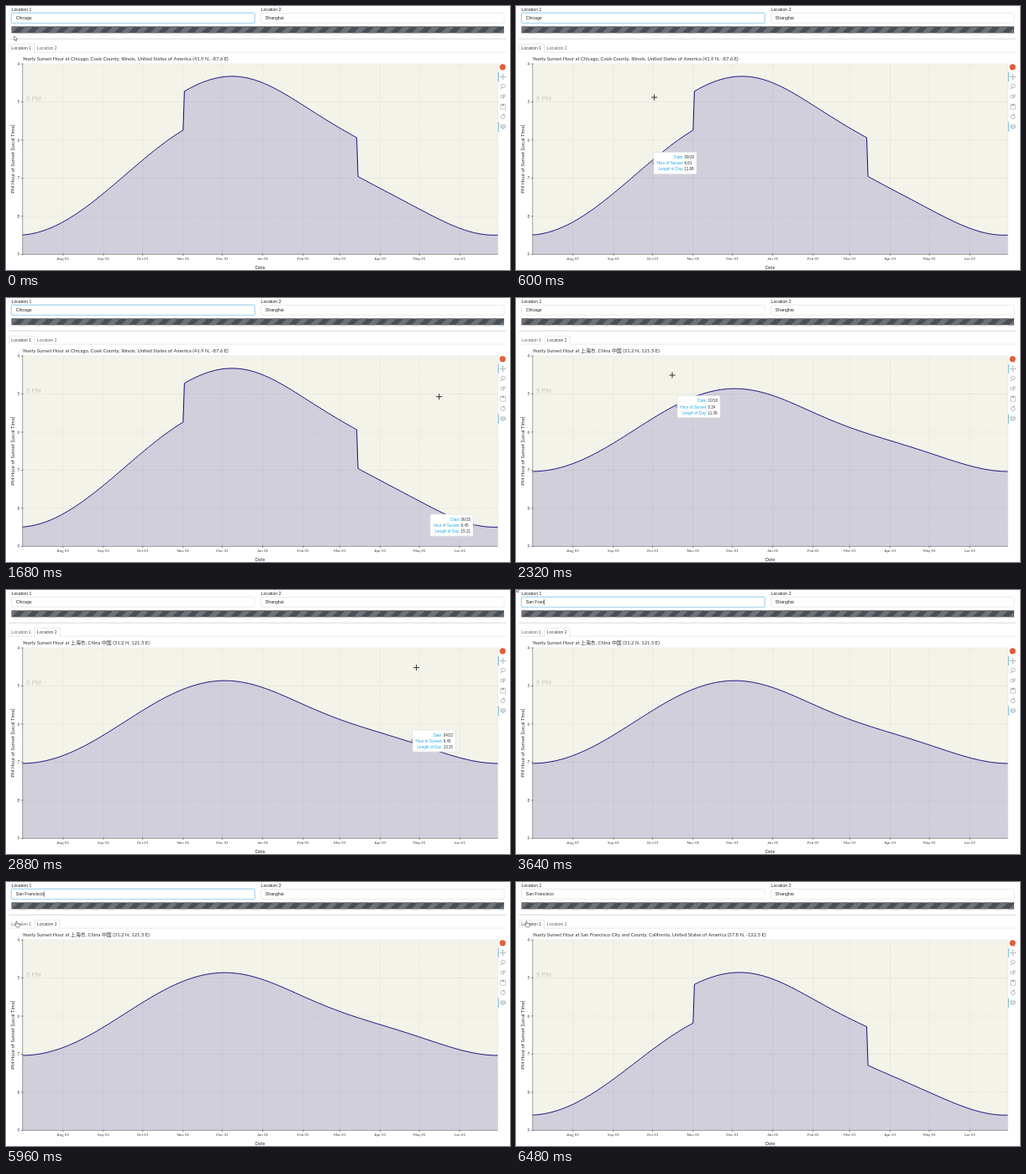
An HTML page with a canvas for the animation above (6.56 s loop, 600 by 315 pixels).

```html
<!DOCTYPE html>
<html lang="en">
<head>
<meta charset="utf-8">
<title>Yearly sunset hours</title>
<style>
html, body { margin: 0; width: 100%; height: 100%; overflow: hidden; background: #fff; }
canvas { display: block; width: 600px; height: 315px; }
</style>
</head>
<body>
<canvas id="stage"></canvas>
<script>
const LOOP = 6560;
const SANS = '"Liberation Sans", Arial, sans-serif';
const LATO = 'Lato, "Noto Sans CJK SC", "Noto Sans CJK", sans-serif';
const LEFT = 19.7, TOP = 69, RIGHT = 585.5, BOTTOM = 296.4;
const DAY = 1.554, HOUR = (BOTTOM - TOP) / 5;
const RAD = Math.PI / 180;

const PLACES = {
  chicago: { title: 'Chicago, Cook County, Illinois, United States of America (41.9 N, -87.6 E)',
    lat: 41.9, lon: -87.6, zone: -6, dst: true },
  shanghai: { title: '上海市, China 中国 (31.2 N, 121.5 E)',
    lat: 31.2, lon: 121.5, zone: 8, dst: false },
  sanFrancisco: { title: 'San Francisco City and County, California, United States of America (37.8 N, -122.5 E)',
    lat: 37.8, lon: -122.5, zone: -8, dst: true }
};

const MONTHS = [['Aug', 31], ['Sep', 62], ['Oct', 92], ['Nov', 123], ['Dec', 153], ['Jan', 184],
  ['Feb', 215], ['Mar', 243], ['Apr', 274], ['May', 304], ['Jun', 335]];

// Pointer path: time, x, y
const PATH = [[0, 9.7, 35.6], [80, 11, 42], [200, 22, 95], [600, 164.5, 109], [1160, 223, 111],
  [1360, 300, 112], [1660, 565, 125], [1880, 48, 49], [2040, 48, 49], [2160, 75, 85],
  [2280, 186, 92], [2340, 186, 92], [2720, 400, 95], [2920, 510, 92], [3100, 45, 14],
  [3200, 45, 14], [3320, 0, -3], [5320, 0, -3], [5900, 12, 47], [6480, 12, 47], [6560, 9.7, 35.6]];
const TAB_2 = 1960, FOCUS = 3160, TYPE = 3280, TAB_1 = 6160;

const canvas = document.getElementById('stage');
const ctx = canvas.getContext('2d');
const scale = window.devicePixelRatio || 1;
canvas.width = 600 * scale;
canvas.height = 315 * scale;

const dayX = d => LEFT + d * DAY;
const hourY = h => TOP + (h - 4) * HOUR;

// Solar position for a day counted from July 1
function sun(place, d) {
  const g = 2 * Math.PI / 365.25 * (182.7 + d);
  const { cos, sin, tan } = Math;
  const dec = 0.006918 - 0.399912 * cos(g) + 0.070257 * sin(g) - 0.006758 * cos(2 * g)
    + 0.000907 * sin(2 * g) - 0.002697 * cos(3 * g) + 0.00148 * sin(3 * g);
  const eqTime = 229.18 * (0.000075 + 0.001868 * cos(g) - 0.032077 * sin(g)
    - 0.014615 * cos(2 * g) - 0.040849 * sin(2 * g));
  const lat = place.lat * RAD;
  const angle = Math.acos(cos(90.833 * RAD) / (cos(lat) * cos(dec)) - tan(lat) * tan(dec)) / RAD;
  const summer = place.dst && (d <= 123 || d >= 257) ? 1 : 0;
  return {
    sunset: (4 * (angle - place.lon) - eqTime) / 60 + place.zone + summer,
    length: angle * 2 / 15
  };
}

function text(str, x, y, size, color = '#222', align = 'left', family = SANS) {
  ctx.font = `${size}px ${family}`;
  ctx.fillStyle = color;
  ctx.textAlign = align;
  ctx.fillText(str, x, y);
}

function line(points, color, width = 0.6, dash = []) {
  ctx.beginPath();
  points.forEach(([x, y]) => ctx.lineTo(x, y));
  ctx.setLineDash(dash);
  ctx.strokeStyle = color;
  ctx.lineWidth = width;
  ctx.stroke();
  ctx.setLineDash([]);
}

function box(x, y, w, h, fill, stroke, r = 0, width = 0.6) {
  ctx.beginPath();
  ctx.roundRect(x, y, w, h, r);
  if (fill) { ctx.fillStyle = fill; ctx.fill(); }
  if (stroke) { ctx.strokeStyle = stroke; ctx.lineWidth = width; ctx.stroke(); }
}

function shape(points, fill, stroke, width = 0.6) {
  ctx.beginPath();
  points.forEach(([x, y]) => ctx.lineTo(x, y));
  ctx.closePath();
  ctx.fillStyle = fill;
  ctx.fill();
  if (stroke) { ctx.strokeStyle = stroke; ctx.lineWidth = width; ctx.stroke(); }
}

function input(x, label, value, focused, caret) {
  text(label, x, 6.4, 5.2);
  if (focused) box(x - 0.5, 8, 290.5, 12.8, null, '#d3ebf8', 2, 1.3);
  box(x, 8.5, 289.5, 11.8, '#fff', focused ? '#83c4e8' : '#dcdcdc', 1.5);
  text(value, x + 5.2, 16.4, 5.2);
  if (caret) {
    const end = x + 5.6 + ctx.measureText(value).width;
    line([[end, 11.4], [end, 17.6]], '#111', 0.6);
  }
}

function stripes() {
  const x = 6.5, y = 24.2, w = 586.5, h = 8.4, step = 17.3;
  ctx.save();
  ctx.beginPath();
  ctx.rect(x, y, w, h);
  ctx.clip();
  ctx.fillStyle = '#4a5057';
  ctx.fillRect(x, y, w, h);
  for (let s = x; s < x + w + step; s += step)
    shape([[s, y], [s + step / 2, y], [s + step / 2 - h, y + h], [s - h, y + h]], '#6e7276');
  ctx.restore();
}

function tabs(active) {
  line([[3.5, 55.2], [595, 55.2]], '#e0e0e0');
  [4, 34.5].forEach((x, i) => {
    if (i === active) {
      box(x - 0.3, 45, 29.6, 11, '#fff');
      line([[x, 55.4], [x, 45.3], [x + 29.5, 45.3], [x + 29.5, 55.4]], '#d8d8d8');
    }
    text('Location ' + (i + 1), x + 2.3, 52.4, 5.2, i === active ? '#444' : '#666');
  });
}

function plot(place) {
  text('Yearly Sunset Hour at ' + place.title, LEFT, 65.4, 5.9, '#333', 'left', LATO);
  box(LEFT, TOP, RIGHT - LEFT, BOTTOM - TOP, '#f4f3ea', '#e2e2e0');

  const curve = [];
  for (let d = 0; d <= 364; d++) curve.push([dayX(d), hourY(sun(place, d).sunset)]);
  const grid = points => line(points, '#dcdcd2', 0.6, [2, 1.2]);
  MONTHS.forEach(([, d]) => grid([[dayX(d), TOP], [dayX(d), BOTTOM]]));
  for (let h = 5; h < 9; h++) grid([[LEFT, hourY(h)], [RIGHT, hourY(h)]]);
  text('5 PM', 24, 112.8, 7.7, '#c9c9c1');
  shape([...curve, [RIGHT, BOTTOM], [LEFT, BOTTOM]], 'rgba(12,0,136,.15)');
  line(curve, '#140c7c', 1);

  line([[LEFT, TOP], [LEFT, BOTTOM], [RIGHT, BOTTOM]], '#777', 0.6);
  for (let h = 4; h <= 9; h++) {
    line([[LEFT - 1.8, hourY(h)], [LEFT + 0.8, hourY(h)]], '#555');
    text(h, 16.2, hourY(h) + 1.7, 4.7, '#444', 'right', LATO);
  }
  MONTHS.forEach(([name, d]) => {
    line([[dayX(d), BOTTOM - 0.8], [dayX(d), BOTTOM + 1.8]], '#555');
    text(name + ' 01', dayX(d), 303.2, 4.6, '#444', 'center', LATO);
  });
  text('Date', 302.6, 313.7, 5.6, '#333', 'center', LATO);
  ctx.save();
  ctx.translate(10, 182.6);
  ctx.rotate(-Math.PI / 2);
  text('PM Hour of Sunset [Local Time]', 0, 0, 5.9, '#333', 'center', LATO);
  ctx.restore();
}

function circle(x, y, r, fill, stroke) {
  ctx.beginPath();
  ctx.arc(x, y, r, 0, 7);
  if (fill) { ctx.fillStyle = fill; ctx.fill(); }
  if (stroke) { ctx.strokeStyle = stroke; ctx.lineWidth = 0.7; ctx.stroke(); }
}

function toolbar() {
  const x = 591.6, grey = '#a2a5a8';
  circle(x - 0.4, 72.8, 3.6, '#e0603a');
  [84.5, 144.2].forEach(y => line([[586.3, y - 5.6], [586.3, y + 5.6]], '#4fa9c6', 0.8));
  // pan
  line([[x - 3, 84.5], [x + 3, 84.5]], grey, 0.7);
  line([[x, 81.5], [x, 87.5]], grey, 0.7);
  [[1, 0], [-1, 0], [0, 1], [0, -1]].forEach(([a, b]) =>
    shape([[x + a * 3.6, 84.5 + b * 3.6], [x + a * 2.2 + b, 84.5 + b * 2.2 + a],
      [x + a * 2.2 - b, 84.5 + b * 2.2 - a]], grey));
  // box zoom
  circle(x + 0.6, 95.6, 2.1, null, grey);
  line([[x - 1, 97.2], [x - 3.2, 99.4]], grey, 1);
  line([[x - 3, 96], [x - 3, 93], [x, 93]], grey, 0.5, [0.8, 0.6]);
  // wheel zoom
  box(x - 3, 106.4, 3, 3.6, null, grey, 0.8);
  circle(x + 1.4, 107, 1.4, null, grey);
  line([[x + 1.2, 108.5], [x + 0.6, 110.4]], grey, 0.7);
  // save
  box(x - 3, 117.2, 6, 6, null, grey, 0.4);
  box(x - 1.5, 117.2, 3, 1.8, grey);
  // reset
  ctx.beginPath();
  ctx.arc(x, 132.2, 2.5, -0.6, 5);
  ctx.strokeStyle = grey;
  ctx.lineWidth = 0.8;
  ctx.stroke();
  shape([[x + 0.4, 128.6], [x + 2.6, 129.8], [x + 0.5, 131.2]], grey);
  // hover
  box(x - 2.8, 141.8, 5.6, 4, '#c6ccd0', '#b4babd', 0.6);
  line([[x - 1.8, 143], [x + 1.8, 143]], '#fff', 0.5);
  line([[x - 1.8, 144.6], [x + 1.8, 144.6]], '#fff', 0.5);
  shape([[x - 0.9, 145.8], [x + 0.9, 145.8], [x, 147.4]], '#b4babd');
}

function pointer(t) {
  const i = Math.max(1, PATH.findIndex(p => p[0] >= t));
  const [t0, x0, y0] = PATH[i - 1], [t1, x1, y1] = PATH[i];
  const k = Math.max(0, (t - t0) / (t1 - t0));
  return [x0 + (x1 - x0) * k, y0 + (y1 - y0) * k];
}

const inPlot = ([x, y]) => x > LEFT && x < RIGHT && y > TOP && y < BOTTOM;

function tooltip(place, pos) {
  const d = Math.round((pos[0] - LEFT) / DAY);
  const { sunset, length } = sun(place, d);
  const date = new Date(Date.UTC(2020, 6, 1 + d)).toISOString().slice(5, 10).replace('-', '/');
  const y = hourY(sunset) - 0.4, flip = dayX(d) > 500;
  const side = flip ? -1 : 1;
  const edge = dayX(d) + side * 6;
  const x = flip ? edge - 51 : edge;
  box(x, y - 13, 51, 26, '#fff', '#dedede', 1);
  shape([[edge, y - 2.6], [edge - side * 3, y], [edge, y + 2.6]], '#a9a9b4');
  [['Date:', date], ['Hour of Sunset:', sunset.toFixed(2)], ['Length of Day:', length.toFixed(2)]]
    .forEach(([label, value], i) => {
      const row = y - 5.3 + i * 7.1;
      text(label, x + 35.3, row, 4.6, '#26aae1', 'right');
      text(value, x + 36.5, row, 4.6, '#333');
    });
}

function cursor([x, y]) {
  const at = pts => pts.map(([a, b]) => [x + a, y + b]);
  if (inPlot([x, y])) {
    line(at([[-3.6, 0], [3.6, 0]]), '#222', 0.9);
    line(at([[0, -3.6], [0, 3.6]]), '#222', 0.9);
  } else if (y > 45 && y < 55 && x > 4 && x < 64) {
    shape(at([[0, 0], [1, 0], [1.2, 2.4], [4.3, 3.2], [4.2, 5.5], [3.5, 7], [0.6, 7],
      [-1.5, 4.3], [-0.9, 3.7], [0, 4.4]]), '#fff', '#333', 0.5);
  } else {
    shape(at([[0, 0], [0, 5.4], [1.3, 4.3], [2.2, 6.2], [3, 5.8], [2.2, 4], [3.8, 3.9]]), '#fff', '#333', 0.5);
  }
}

function draw(t) {
  const second = t >= TAB_2 && t < TAB_1;
  const place = second ? PLACES.shanghai : t < TAB_2 ? PLACES.chicago : PLACES.sanFrancisco;
  const typing = t >= FOCUS && t < TAB_1;
  const typed = Math.max(0, Math.floor((t - TYPE) / 50) + 1);
  const value = t < TYPE ? 'Chicago' : 'San Francisco'.slice(0, typed);

  ctx.setTransform(scale, 0, 0, scale, 0, 0);
  ctx.fillStyle = '#fff';
  ctx.fillRect(0, 0, 600, 315);
  input(6.5, 'Location 1', value, t < TAB_2 || typing, typing);
  input(303.6, 'Location 2', 'Shanghai');
  stripes();
  line([[3.5, 39.2], [595, 39.2]], '#c8c6ca', 0.7);
  tabs(second ? 1 : 0);
  plot(place);
  toolbar();

  const hover = pointer(Math.max(0, t - 20));
  const pos = pointer(t);
  if (inPlot(hover) && inPlot(pos)) tooltip(place, hover);
  cursor(pos);
}

const start = performance.now();
function tick() {
  draw((performance.now() - start) % LOOP);
  requestAnimationFrame(tick);
}
tick();
</script>
</body>
</html>
```
